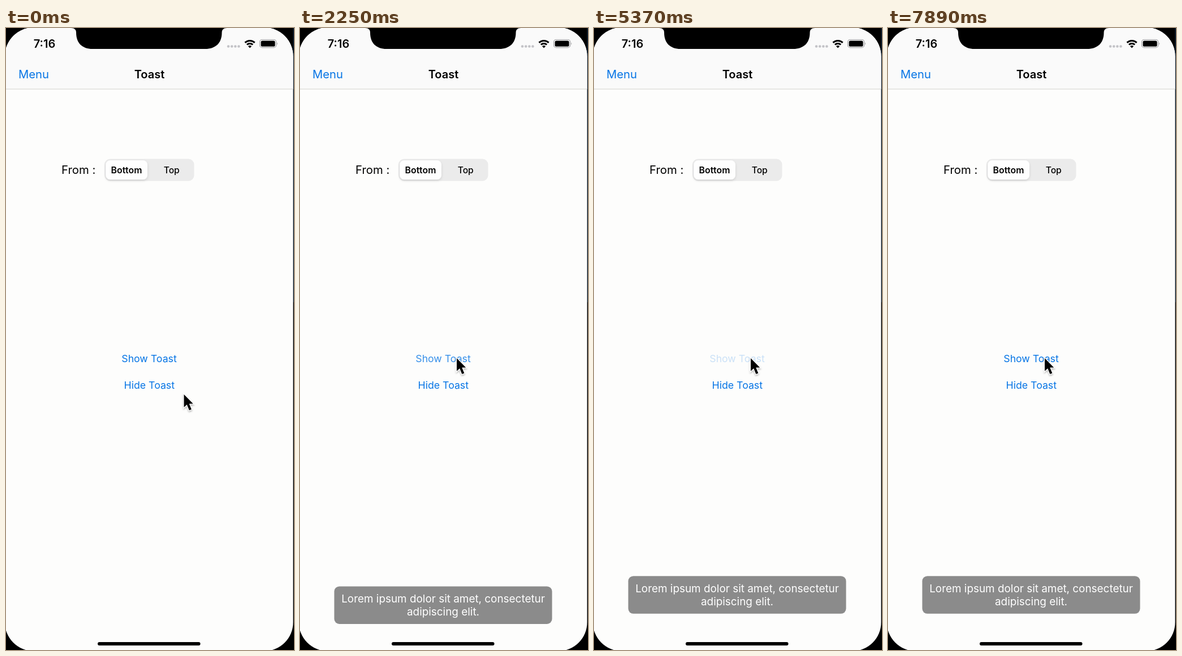
Animation, 509 px wide and 1100 px high, one loop 7.99 s. Source, as an HTML page:

```html
<!DOCTYPE html>
<html lang="en">
<head>
<meta charset="utf-8">
<title>Toast</title>
<style>
  html, body { margin: 0; width: 100%; height: 100%; overflow: hidden; background: #000; }
  svg { display: block; width: 509px; height: 1100px; font-family: Inter, "Open Sans", sans-serif; }
  text { text-anchor: middle; }
  .link { fill: #0675e5; }
  .bold { font-weight: 600; }
  .body { font-size: 20.3px; }
  .button { font-size: 17.7px; }
  .toast { font-size: 18.9px; fill: #fff; }
</style>
</head>
<body>
<svg viewBox="0 0 509 1100">
  <defs>
    <filter id="soft" x="-50%" y="-50%" width="200%" height="200%">
      <feDropShadow dx="0" dy="2" stdDeviation="1.8" flood-opacity=".3"/>
    </filter>
    <filter id="lift" x="-20%" y="-30%" width="140%" height="170%">
      <feDropShadow dx="0" dy="2" stdDeviation="2" flood-opacity=".13"/>
    </filter>
    <clipPath id="screen"><rect x="-2" y="-1" width="509.5" height="1103" rx="51"/></clipPath>
    <g id="message">
      <rect x="60.5" width="385" height="66.6" rx="9" fill="#000" fill-opacity=".45"/>
      <text class="toast" x="253" y="28.8">Lorem ipsum dolor sit amet, consectetur</text>
      <text class="toast" x="253" y="52.1">adipiscing elit.</text>
    </g>
  </defs>

  <rect x="507" width="2" height="485" fill="#0b1826"/>
  <g clip-path="url(#screen)">
    <rect x="-2" y="-1" width="511" height="1103" fill="#fdfdfc"/>
    <rect x="-2" y="-1" width="511" height="109" fill="#fafafa"/>
    <path d="M0 108H509" stroke="#d2d2cd"/>
  </g>
  <path d="M115 0C121 0 124 3 124 8C124 27 135 37 153 37H352C370 37 381.5 27 381.5 8C381.5 3 384.5 0 390.5 0Z"/>

  <text class="bold" x="68" y="35" font-size="20">7:16</text>
  <g fill="#c3c3c7">
    <circle cx="393" cy="32.5" r="2.3"/><circle cx="399.2" cy="32.5" r="2.3"/>
    <circle cx="405.3" cy="32.5" r="2.3"/><circle cx="411.4" cy="32.5" r="2.3"/>
  </g>
  <g fill="none" stroke="#000" stroke-width="2.9">
    <path d="M422.4 25.9A12.5 12.5 0 0 1 439.6 25.9M425.8 29.5A7.6 7.6 0 0 1 436.2 29.5"/>
  </g>
  <path d="M431 35.4L427.9 32.2A4.4 4.4 0 0 1 434.1 32.2Z"/>
  <rect x="448.5" y="20.5" width="29" height="14.2" rx="4.3" fill="none" stroke="#a2a2a5" stroke-width="1.2"/>
  <rect x="450.5" y="22.4" width="25" height="10.4" rx="2.6"/>
  <path d="M479.2 25.3Q481.2 27.6 479.2 29.9Z" fill="#a2a2a5"/>

  <text class="link body" x="49" y="88.7">Menu</text>
  <text class="bold" x="253.5" y="88.7" font-size="20">Toast</text>

  <text class="body" x="128.2" y="258">From :</text>
  <rect x="174" y="231.5" width="158.5" height="39" rx="10" fill="#ebebeb"/>
  <rect x="176.3" y="234" width="73.7" height="34" rx="8" fill="#fefefe" filter="url(#lift)"/>
  <text class="bold" x="213" y="257" font-size="15.8">Bottom</text>
  <text x="292.7" y="257" font-size="15.6" font-weight="500">Top</text>

  <text id="show" class="link button" x="253" y="591">Show Toast</text>
  <text class="link button" x="253.3" y="637.7">Hide Toast</text>

  <use id="first" href="#message"/>
  <use id="second" href="#message"/>
  <rect x="162" y="1086" width="181.5" height="6" rx="3"/>

  <path id="cursor" d="M0 0V22.8L5.2 18L9.3 28L13.3 26.4L9.2 16.6H16.2Z" stroke="#fff"
    stroke-width="2.4" paint-order="stroke" filter="url(#soft)"/>
</svg>
<script>
const LOOP = 7990, REST = 969.2, BELOW = 1100;
const el = id => document.getElementById(id);
const clamp = v => Math.min(1, Math.max(0, v));
const smooth = v => { v = clamp(v); return v * v * (3 - 2 * v); };
const mix = (a, b, p) => a + (b - a) * p;

// Ticks come in threes every 140 ms, lasting 20, 20 and 100 ms.
function tickAt(t) {
  if (t < 150) return t < 100 ? 0 : t < 120 ? 1 : 2;
  const phase = (t - 10) % 140;
  return 3 * Math.floor((t - 10) / 140) + (phase < 20 ? 0 : phase < 40 ? 1 : 2);
}

// Critically damped slide up to the resting place.
function slide(ticks) {
  const w = 0.257 * Math.max(0, ticks);
  return mix(REST, BELOW, (1 + w) * Math.exp(-w));
}

function buttonAlpha(n) {
  const [down, up] = n < 80 ? [30, 34.5] : [115, 122];
  return n < down ? 1 : mix(0.2, 1, smooth((n - up) / 20));
}

function place(id, y, alpha) {
  el(id).setAttribute("transform", `translate(0 ${y.toFixed(2)})`);
  el(id).setAttribute("opacity", alpha);
}

function draw(now) {
  const n = tickAt(now % LOOP);
  const swap = smooth((n - 120) / 20);
  place("first", slide(n - 34.5), 1 - swap);
  place("second", slide(n - 120), swap);
  el("show").setAttribute("opacity", buttonAlpha(n));
  const move = smooth((n - 5) / 16);
  el("cursor").setAttribute("transform", `translate(${mix(314.5, 277, move)} ${mix(648, 584, move)})`);
}

const start = performance.now();
function frame() {
  draw(performance.now() - start);
  requestAnimationFrame(frame);
}
frame();
</script>
</body>
</html>
```
